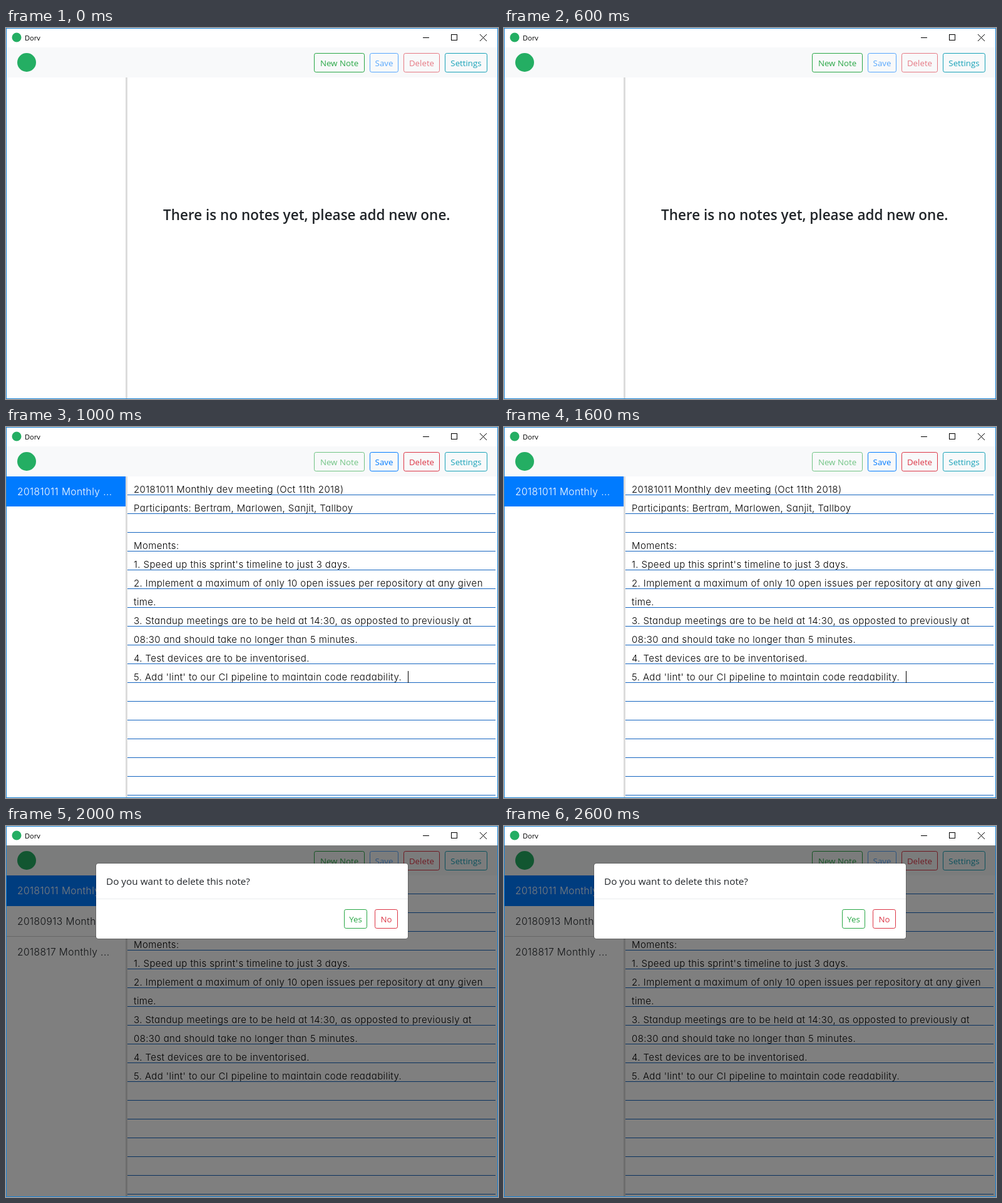
An HTML page for the animation above (3 s loop, 786x593 px).

```html
<!DOCTYPE html>
<html lang="en">
<head>
<meta charset="utf-8">
<title>Notes</title>
<style>
  html, body { margin: 0; width: 100%; height: 100%; overflow: hidden; background: #fff; }
  svg { display: block; width: 786px; height: 593px; font-family: "Open Sans", "Noto Sans", sans-serif; fill: #212529; }
  .crisp { shape-rendering: crispEdges; }
  .hand { font: 300 15px Inter, "Noto Sans", sans-serif; letter-spacing: .4px; font-feature-settings: "cv11"; fill: #000; }
  .item { font-size: 15.6px; fill: #212529; }
  .item.active { fill: #fff; }
  .title { font-size: 11px; fill: #000; }
  .empty { font-size: 22.5px; font-weight: 600; }
  .ask { font-size: 15.3px; }
  .btn text { font-size: 13.3px; text-anchor: middle; fill: currentColor; }
  .btn rect { fill: none; stroke: currentColor; }
</style>
</head>
<body>
<svg id="stage" viewBox="0 0 786 593" xmlns="http://www.w3.org/2000/svg"></svg>
<script>
const NS = "http://www.w3.org/2000/svg";
const stage = document.getElementById("stage");
const STEP = 1000, STEPS = 3;
const GREEN = "#28a745", BLUE = "#007bff", RED = "#dc3545", TEAL = "#17a2b8", LOGO = "#24ae63";
const timed = [];

function add(parent, tag, attrs = {}, content) {
  const el = document.createElementNS(NS, tag);
  for (const key in attrs) el.setAttribute(key, attrs[key]);
  if (content) el.textContent = content;
  return parent.appendChild(el);
}
const box = (parent, x, y, width, height, fill) =>
  add(parent, "rect", { x, y, width, height, fill, class: "crisp" });
const label = (parent, x, y, cls, content) =>
  add(parent, "text", { x, y, class: cls }, content);

// A group that is visible only during the listed steps.
function during(steps, parent = stage) {
  const g = add(parent, "g");
  timed.push(now => g.setAttribute("visibility", steps.includes(now) ? "visible" : "hidden"));
  return g;
}

function button(parent, x, y, width, content, color, disabledSteps = []) {
  const g = add(parent, "g", { class: "btn", color });
  add(g, "rect", { x: x + .5, y: y + .5, width: width - 1, height: 30, rx: 2.7 });
  add(g, "text", { x: x + width / 2, y: y + 21 }, content);
  timed.push(now => g.setAttribute("opacity", disabledSteps.includes(now) ? .65 : 1));
}

// Window and toolbar
box(stage, 0, 0, 786, 593, "#1883d7");
box(stage, 1, 1, 784, 591, "#fff");
box(stage, 1, 31, 784, 48, "#f8f9fa");
box(stage, 191, 79, 3, 513, "#dcdcdc");
add(stage, "circle", { cx: 17, cy: 15, r: 7.5, fill: LOGO });
add(stage, "circle", { cx: 33, cy: 55, r: 15, fill: LOGO });
label(stage, 30, 20, "title", "Dorv");
box(stage, 666, 15, 10, 1, "#000");
add(stage, "rect", { x: 711.5, y: 10.5, width: 9, height: 9, fill: "none", stroke: "#000" });
add(stage, "path", { d: "M757 10L768 21M768 10L757 21", stroke: "#000" });

button(stage, 492, 40, 81, "New Note", GREEN, [1]);
button(stage, 581, 40, 46, "Save", BLUE, [0, 2]);
button(stage, 635, 40, 58, "Delete", RED, [0]);
button(stage, 701, 40, 68, "Settings", TEAL);

// Empty state
label(during([0]), 251, 306.5, "empty", "There is no notes yet, please add new one.");

// Open note on ruled paper
const note = during([1, 2]);
for (let y = 108; y < 592; y += 30) box(note, 194, y, 588, 1, "#1565c0");
[
  "20181011 Monthly dev meeting (Oct 11th 2018)",
  "Participants: Bertram, Marlowen, Sanjit, Tallboy",
  "",
  "Moments:",
  "1. Speed up this sprint's timeline to just 3 days.",
  "2. Implement a maximum of only 10 open issues per repository at any given",
  "time.",
  "3. Standup meetings are to be held at 14:30, as opposted to previously at",
  "08:30 and should take no longer than 5 minutes.",
  "4. Test devices are to be inventorised.",
  "5. Add 'lint' to our CI pipeline to maintain code readability."
].forEach((line, i) => label(note, 204, 105 + 30 * i, "hand", line));
box(during([1]), 642, 390, 1, 19, "#000");

// Note list
box(note, 1, 79, 190, 48, BLUE);
label(note, 18, 109, "hand item active", "20181011 Monthly ...");
const older = during([2]);
box(older, 1, 127, 190, 1, BLUE);
box(older, 1, 176, 190, 1, "#d0d0d0");
label(older, 18, 158, "hand item", "20180913 Monthly ...");
label(older, 18, 207, "hand item", "2018817 Monthly ...");

// Delete dialog
const dialog = during([2]);
add(dialog, "rect", { x: 1, y: 31, width: 784, height: 561, fill: "#000", "fill-opacity": .5 });
add(dialog, "rect", { x: 143, y: 59, width: 500, height: 122, rx: 4.8, fill: "#000", "fill-opacity": .2 });
add(dialog, "rect", { x: 144, y: 60, width: 498, height: 120, rx: 3.8, fill: "#fff" });
box(dialog, 144, 116, 498, 1, "#e9ecef");
label(dialog, 160, 94, "ask", "Do you want to delete this note?");
button(dialog, 540, 133, 37, "Yes", GREEN);
button(dialog, 589, 133, 37, "No", RED);

let shown = -1;
function tick() {
  const now = Math.floor(performance.now() / STEP) % STEPS;
  if (now !== shown) timed.forEach(update => update(now));
  shown = now;
  requestAnimationFrame(tick);
}
tick();
</script>
</body>
</html>
```
